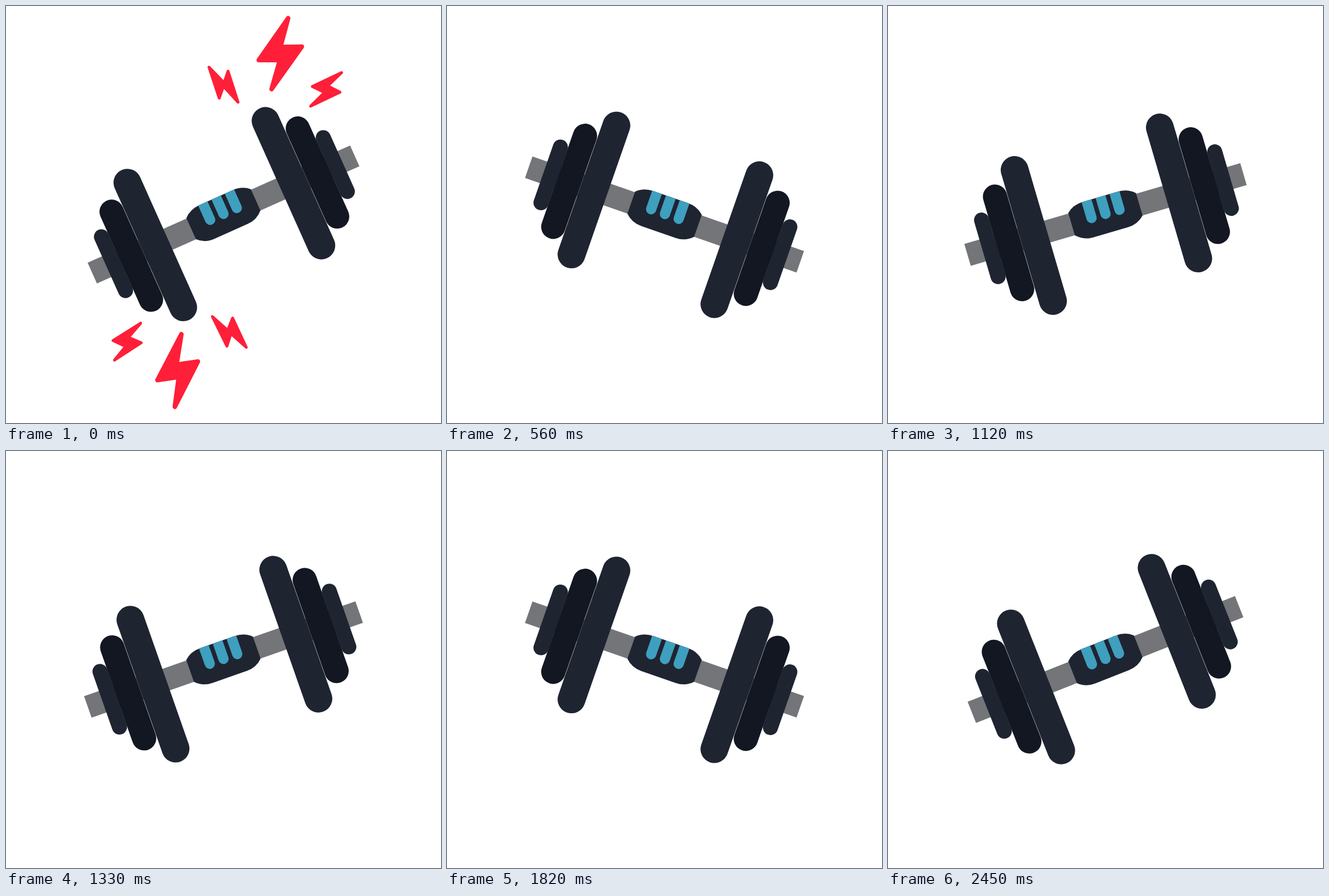
Animation, 764 px wide and 733 px high, one loop 2520 ms. Source, as an HTML page:

```html
<!DOCTYPE html>
<html>
<head>
<meta charset="utf-8">
<title>Dumbbell</title>
<style>
  html, body { margin: 0; width: 100%; height: 100%; overflow: hidden; background: #fff; }
  svg { display: block; width: 764px; height: 733px; }
  .bolts { fill: #ff1f38; stroke: #ff1f38; stroke-width: 5; stroke-linejoin: round; }
  .big { stroke-width: 8; }
</style>
</head>
<body>
<svg viewBox="0 0 764 733">
  <g id="upper" class="bolts">
    <polygon class="big" points="495.5,21.5 482,72 519.5,71.5 466.5,146 481,95 444,95"/>
    <polygon points="356.5,107.5 383,135 390,114.5 407.5,169 382,141 374.5,162"/>
    <polygon points="589.5,117 565,140.5 586.5,151.5 535,176 559.5,152 538,141.5"/>
  </g>
  <g id="lower" class="bolts">
    <polygon class="big" points="308,577 299.5,630.5 337,625 296.5,704.5 303.5,652 266,657.5"/>
    <polygon points="236.5,557.5 215,582.5 237.5,592 190.5,622.5 210,598.5 188,588"/>
    <polygon points="362.5,546 389.5,570 398,548.5 422,600 395,576 388,598"/>
  </g>
  <g id="dumbbell">
    <rect x="-252.5" y="-20" width="505" height="40" fill="#747579"/>
    <g id="plates"></g>
    <path fill="#1f2431" d="M-62-21Q-50-32.5-32-32.5H32Q50-32.5 62-21V20Q50 32.5 32 32.5H-32Q-50 32.5-62 20Z"/>
    <path id="stripes" fill="#3f9fbf"/>
  </g>
</svg>
<script>
const STEP = 70, STEPS = 18;
const $ = id => document.getElementById(id);

// [distance from centre, radius, half height, colour]
const plates = [
  [213.4, 13.2, 65, '#1f2431'],
  [179.1, 21.3, 106, '#121722'],
  [132.9, 24.4, 144.4, '#1f2431']
];
$('plates').innerHTML = plates.flatMap(([d, r, h, color]) => [-d, d].map(x =>
  `<rect x="${x + 1.7 - r}" y="${-h}" width="${2 * r}" height="${2 * h}" rx="${r}" fill="${color}"/>`
)).join('');
$('stripes').setAttribute('d', [-25.2, 0.4, 26].map(x =>
  `M${x - 9}-32.5V-1a9 9 0 0 0 18 0V-32.5Z`).join(''));

// [step, degrees]: the swing is linear between these
const swing = [[0, -24.1], [1, -19.3], [8, 19.2], [9, 20.8], [12, 4.8], [17, -21.6], [18, -24.1]];

function angleAt(step) {
  const i = swing.findIndex(([s]) => s > step);
  const [s0, a0] = swing[i - 1], [s1, a1] = swing[i];
  return a0 + (a1 - a0) * (step - s0) / (s1 - s0);
}

function placeBolts(id, step, mirrorShift) {
  const mirrored = step === 9;
  $(id).setAttribute('visibility', step === 0 || mirrored ? 'visible' : 'hidden');
  $(id).setAttribute('transform', mirrored ? `translate(764 ${mirrorShift}) scale(-1 1)` : '');
}

function draw(time) {
  const step = Math.floor(time / STEP) % STEPS;
  $('dumbbell').setAttribute('transform', `translate(382 366.5) rotate(${angleAt(step)})`);
  placeBolts('upper', step, 20);
  placeBolts('lower', step, -5);
}

const start = performance.now();
function tick() {
  draw(performance.now() - start);
  requestAnimationFrame(tick);
}
tick();
</script>
</body>
</html>
```
